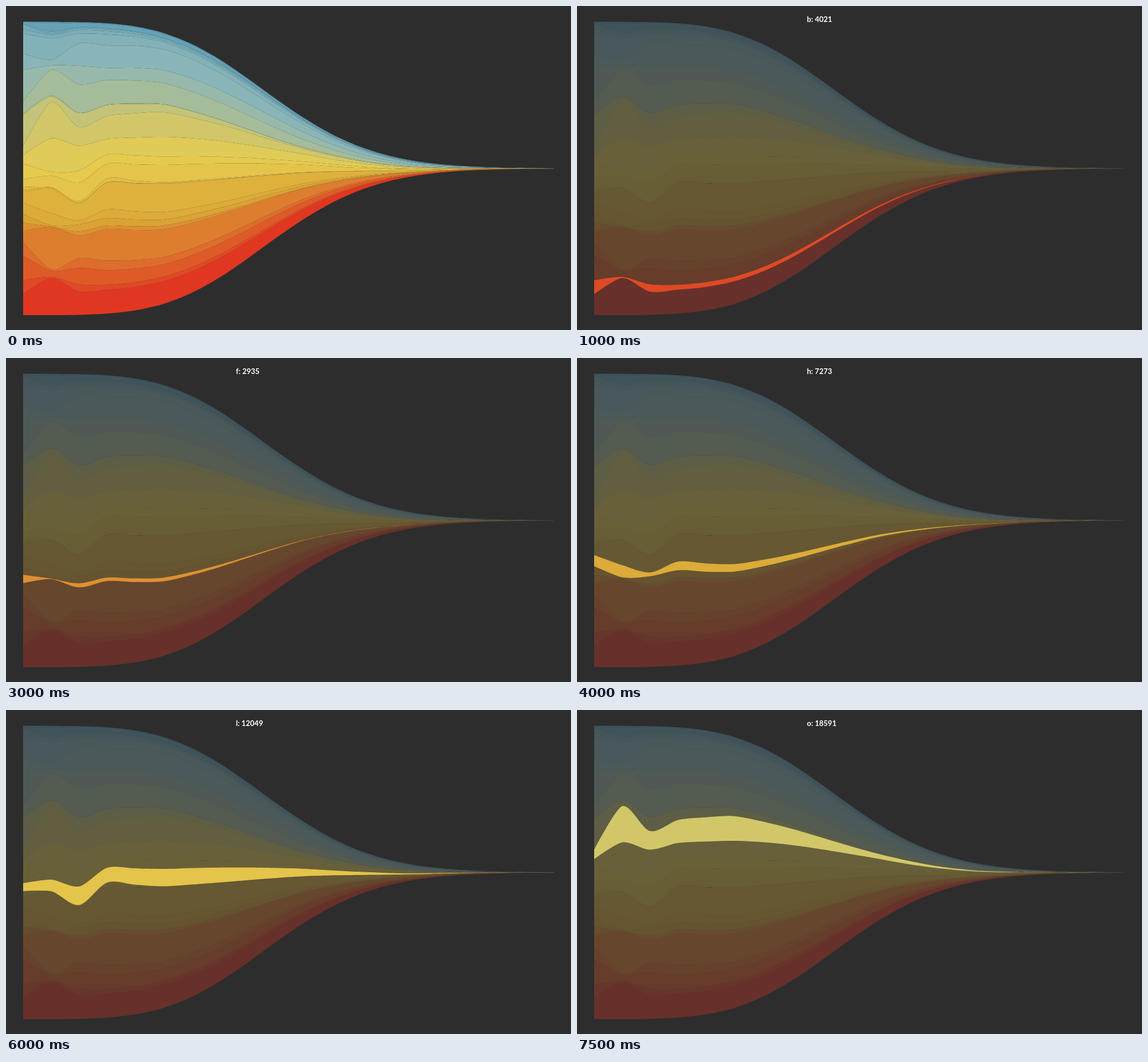
An HTML page that plays this animation: 988 by 567 pixels, repeating every 8 s.

```html
<!DOCTYPE html>
<html lang="en">
<head>
<meta charset="utf-8">
<title>Letter stream</title>
<style>
  html, body { margin: 0; width: 100%; height: 100%; overflow: hidden; background: #2d2d2d; }
  svg { display: block; }
  text { font: bold 13px Lato, "Open Sans", sans-serif; fill: #fff; }
</style>
</head>
<body>
<svg width="988" height="567" viewBox="0 0 988 567">
  <g id="bands"></g>
  <text id="label" x="402" y="28"></text>
</svg>
<script>
const STEP = 500, LOOP = 8000, DIM = 0.32;
const KNOTS = 20, LEFT = 30, GAP = 928 / 19, MID = 284.3, HALF = 256.8;
const KEYS = [0, 1, 2, 3, 5, 10];
const PALETTE = ["#e03722", "#dba636", "#e7cd50", "#8cb6b8", "#5e9eb7"];

// Weight of each letter, a to z, at the KEYS positions; the last value holds.
const weights = {};
const letter = (name, ...values) => weights[name] = values;
letter("a", 72, 127, 79, 82, 83, 95);
letter("b", 47, 4, 25, 17);
letter("c", 84, 21, 56, 50, 45, 55);
letter("d", 46, 5, 33, 33, 27, 30);
letter("e", 37, 144, 78, 108, 102);
letter("f", 29, 2, 14, 12, 14, 5);
letter("g", 29, 4, 24, 25, 22);
letter("h", 38, 42, 13, 30, 28, 22);
letter("i", 37, 85, 59, 92, 104);
letter("j", 7, 1);
letter("k", 10, 2, 6, 13, 4);
letter("l", 27, 40, 64, 51, 64, 74);
letter("m", 53, 13, 41, 31);
letter("n", 29, 114, 84, 54, 72);
letter("o", 33, 124, 64, 79, 91, 52);
letter("p", 104, 20, 47, 37, 28, 11);
letter("q", 5, 3, 2);
letter("r", 41, 87, 97, 84, 77);
letter("s", 107, 16, 62, 42, 47, 72);
letter("t", 55, 19, 77);
letter("u", 69, 74, 33, 38, 26);
letter("v", 15, 11, 13, 11, 7, 11);
letter("w", 17, 5, 7);
letter("x", 2, 7, 3);
letter("y", 3, 30, 14);
letter("z", 3);
const names = Object.keys(weights);

const counts = [19829, 4021, 11742, 7776, 25371, 2935, 5406, 7273,
  21634, 447, 3231, 12049, 7470, 12764, 18591];

// Share of words that reach position i: a skewed normal tail.
function survival(i) {
  const z = 2.58 * (Math.sqrt(i + 5.2) - 3.75);
  return 1 / (1 + Math.exp(1.5976 * z + 0.07056 * z ** 3));
}

function weightAt(values, i) {
  const at = k => values[Math.min(k, values.length - 1)];
  const next = KEYS.findIndex(k => k >= i);
  if (next < 0) return at(KEYS.length - 1);
  if (next === 0) return at(0);
  const from = KEYS[next - 1];
  return at(next - 1) + (at(next) - at(next - 1)) * (i - from) / (KEYS[next] - from);
}

// Edges of all bands at position i, from the bottom up.
function column(i) {
  const sizes = names.map(n => weightAt(weights[n], i));
  const total = sizes.reduce((a, b) => a + b);
  // Long words end in late letters, so the lower edges sink along the tail.
  const bend = Math.max(0.74, 1 - 0.015 * Math.max(0, i - 10) ** 2);
  const half = HALF * survival(i);
  let rest = total;
  return [0, ...sizes].map(s => {
    rest = Math.max(0, rest - s);
    return [LEFT + GAP * i, MID - half + 2 * half * (rest / total) ** bend];
  });
}

// Cardinal spline with quadratic end pieces.
function curve(pts) {
  const n = pts.length - 1;
  const ctrl = (i, k) => [0, 1].map(a =>
    pts[i][a] + k * 0.15 * (pts[i + 1][a] - pts[i - 1][a]));
  let d = `Q${ctrl(1, -2 / 3)} ${pts[1]}`;
  for (let i = 2; i < n; i++) d += `C${ctrl(i - 1, 1)} ${ctrl(i, -1)} ${pts[i]}`;
  return d + `Q${ctrl(n - 1, 2 / 3)} ${pts[n]}`;
}

function colorAt(i) {
  const pos = i / (names.length - 1) * (PALETTE.length - 1);
  const k = Math.min(Math.floor(pos), PALETTE.length - 2);
  const part = (hex, c) => parseInt(hex.slice(c, c + 2), 16);
  const mix = [1, 3, 5].map(c => {
    const from = part(PALETTE[k], c);
    return Math.round(from + (part(PALETTE[k + 1], c) - from) * (pos - k));
  });
  return `rgb(${mix})`;
}

const group = document.getElementById("bands");
const label = document.getElementById("label");
const columns = Array.from({ length: KNOTS }, (_, i) => column(i));

const paths = names.map((_, i) => {
  const top = columns.map(c => c[i + 1]);
  const bottom = columns.map(c => c[i]).reverse();
  const path = document.createElementNS("http://www.w3.org/2000/svg", "path");
  path.setAttribute("d", "M" + top[0] + curve(top) + "L" + bottom[0] + curve(bottom) + "Z");
  path.setAttribute("fill", colorAt(i));
  group.append(path);
  return path;
});

function show(step) {
  const hot = step - 1;
  paths.forEach((p, i) =>
    p.setAttribute("fill-opacity", hot < 0 || i === hot ? 1 : DIM));
  label.textContent = hot < 0 ? "" : `${names[hot]}: ${counts[hot]}`;
}

const start = performance.now();
let shown = -1;
function tick() {
  const step = Math.floor(((performance.now() - start) % LOOP) / STEP);
  if (step !== shown) show(shown = step);
  requestAnimationFrame(tick);
}
tick();
</script>
</body>
</html>
```
